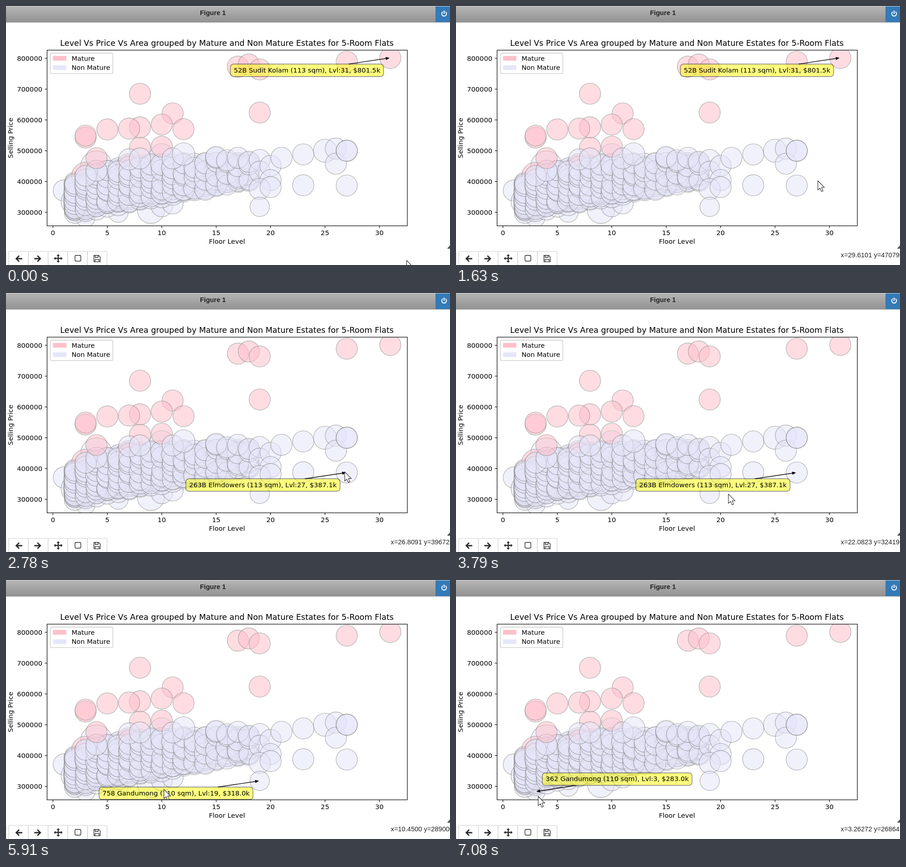
An HTML page for the animation above (8000 ms loop, 978 px wide and 572 px high).

```html
<!DOCTYPE html>
<html lang="en">
<head>
<meta charset="utf-8">
<title>Figure 1</title>
<style>
html, body { margin: 0; width: 100%; height: 100%; overflow: hidden; background: #fff; }
svg { display: block; }
text { white-space: pre; }
.plot text { font-family: "DejaVu Sans", sans-serif; font-size: 14.62px; }
.ui { font-family: "Liberation Sans", Arial, sans-serif; font-size: 14.63px; fill: #222; }
</style>
</head>
<body>
<svg id="stage" width="978" height="572" viewBox="0 0 978 572">
  <defs>
    <linearGradient id="bar" x2="0" y2="1">
      <stop offset="0" stop-color="#b6b6b6"/><stop offset="1" stop-color="#919191"/>
    </linearGradient>
    <clipPath id="area"><rect x="90.5" y="97.5" width="793.5" height="388"/></clipPath>
  </defs>
  <rect width="978" height="572" fill="#fff"/>

  <rect width="978" height="36.5" fill="url(#bar)"/>
  <rect width="978" height="1" fill="#dcdcdc"/>
  <text class="ui" x="455.6" y="20" text-anchor="middle" font-weight="bold">Figure 1</text>
  <rect x="946" y="1" width="40" height="34.5" fill="#337ab7"/>
  <path d="M961.6 13.2a5.2 5.2 0 1 0 6.8 0M965 10.8v6" fill="none" stroke="#fff" stroke-width="2" stroke-linecap="round"/>

  <g class="plot">
    <g id="bubbles" clip-path="url(#area)"></g>
    <g id="axes" stroke="#000" stroke-width="1.2" fill="none">
      <rect x="90.5" y="97.5" width="793.5" height="388"/>
    </g>
    <g id="labels" fill="#000">
      <text x="486.7" y="88" text-anchor="middle" style="font-size:17.58px">Level Vs Price Vs Area grouped by Mature and Non Mature Estates for 5-Room Flats</text>
      <text x="486.7" y="525" text-anchor="middle">Floor Level</text>
      <text transform="translate(15.3 291.5) rotate(-90)" text-anchor="middle">Selling Price</text>
    </g>
    <rect x="97.8" y="104.2" width="137.6" height="45.2" rx="3" fill="#fff" fill-opacity=".8" stroke="#ccc" stroke-width="1.4"/>
    <rect x="103.5" y="110.3" width="29.5" height="10.4" fill="#ffc0cb"/>
    <rect x="103.5" y="131" width="29.5" height="10.4" fill="#e6e6fa"/>
    <text x="144.4" y="120.8">Mature</text>
    <text x="144.4" y="141">Non Mature</text>
    <rect id="box" height="27.5" rx="6.5" fill="#ff0" stroke="#000" stroke-width="1.4" opacity=".5"/>
    <path id="arrow" stroke="#000" stroke-width="1.4"/>
    <path id="head" d="M0 0L-7 -2.9V2.9Z" stroke="#000" stroke-width=".8" stroke-linejoin="round"/>
    <text id="label"></text>
  </g>

  <path d="M978 528.5V536H971.5Z" fill="#555"/>
  <g id="buttons" fill="#fff" stroke="#ccc" stroke-width="1.1"></g>
  <g fill="#2b2b2b">
    <path id="back" d="M20.5 558l7.6-7.4 1.9 1.9-4 4H35.8v3H26l4 4-1.9 1.9Z"/>
    <use href="#back" transform="translate(98.2 0) scale(-1 1)"/>
    <path d="M115 548l3.6 3.9h-2.4v4.4h4.6v-2.4l3.9 3.6-3.9 3.6v-2.4h-4.6v4.4h2.4l-3.6 3.9-3.6-3.9h2.4v-4.4h-4.6v2.4l-3.9-3.6 3.9-3.6v2.4h4.6v-4.4h-2.4Z"/>
  </g>
  <g fill="none" stroke="#2b2b2b" stroke-width="1.4" stroke-linejoin="round">
    <rect x="152" y="550.7" width="12.8" height="12.8" rx="2.4"/>
    <path d="M193.7 550.7h10.2l3.6 3.6v10.6h-13.8ZM196.5 550.7v4.6h6.4v-4.6M196.3 564.9v-5.3h8.6v5.3"/>
  </g>

  <text id="status" class="ui" x="847.6" y="555.3"></text>
  <path id="cursor" d="M0 0V20.4L4.6 16.2 8 23.7 11.4 22.2 8.1 14.8H14.6Z" fill="#fff" stroke="#222" stroke-width="1.1" stroke-linejoin="round"/>
</svg>
<script>
(() => {
  const LOOP = 8000, STEP = 78;
  const $ = id => document.getElementById(id);
  const px = floor => 103.4 + 23.97 * floor;
  const py = price => 115.5 + (800 - price) * 0.6805;

  function set(el, attrs) {
    for (const k in attrs) el.setAttribute(k, attrs[k]);
    return el;
  }

  function add(parent, tag, attrs, text = '') {
    const el = set(document.createElementNS('http://www.w3.org/2000/svg', tag), attrs);
    el.textContent = text;
    $(parent).append(el);
  }

  function drawFrame() {
    for (let v = 0; v <= 30; v += 5) {
      add('axes', 'path', { d: `M${px(v)} 485.5v5` });
      add('labels', 'text', { x: px(v), y: 505.6, 'text-anchor': 'middle' }, v);
    }
    for (let v = 300; v <= 800; v += 100) {
      add('axes', 'path', { d: `M90.5 ${py(v)}h-5` });
      add('labels', 'text', { x: 80, y: py(v) + 5.2, 'text-anchor': 'end' }, v * 1000);
    }
    for (let i = -1; i < 5; i++)
      add('buttons', 'rect', { x: 6.1 + 43.3 * i - (i < 0 ? 6 : 0), y: 542, width: 43.3, height: 40, rx: 2 });
  }

  let seed = 11;
  const rnd = () => (seed = (seed * 16807) % 2147483647) / 2147483647;

  const bubble = (fill, floor, price, r = 23.4) => add('bubbles', 'circle', {
    cx: px(floor), cy: py(price), r, fill, stroke: '#808080', 'stroke-width': 1.4, opacity: 0.55
  });
  const mature = b => bubble('#ffc0cb', ...b);
  const young = b => bubble('#e6e6fa', ...b);

  // Dense band that rises and thins out with the floor
  function crowd(share) {
    for (let floor = 2; floor <= 18; floor++) {
      const up = floor - 2;
      const low = 298 + 6.2 * up;
      const high = 464 - 66 * Math.exp(-up / 3);
      const n = Math.round((30 - 1.35 * up) * share);
      for (let k = 0; k < n; k++)
        young([floor, low + (high - low) * (k + rnd()) / n, 21.5 + 3 * rnd()]);
    }
  }

  // Bubbles: floor, price in thousands, radius
  function drawBubbles() {
    [[1, 371], [2, 335, 30], [3, 283, 21], [6, 300, 22], [9, 308, 30], [10, 320], [11, 329],
     [4, 448, 35], [10, 485, 26]].forEach(young);
    crowd(0.72);
    [[3, 417, 31], [3, 360, 29], [3, 382, 26], [4, 364], [6, 379], [7, 386, 28], [7, 448, 29], [7, 449]].forEach(mature);
    crowd(0.28);
    [[8, 510], [10, 513], [8, 685], [11, 621], [10, 585], [12, 570], [8, 576], [7, 572], [5, 569], [3, 543],
     [3, 549], [17, 773], [18, 780], [19, 764], [19, 624], [27, 789], [31, 801]].forEach(mature);
    [[3, 419], [4, 435], [7, 472], [8, 475], [11, 475], [12, 489, 25], [15, 477], [15, 480], [16, 469],
     [17, 477], [18, 464], [19, 470], [19, 432], [20, 451], [20, 405], [19, 376], [20, 382], [21, 477],
     [23, 488], [25, 500, 25.5], [26, 507], [26, 458], [27, 500], [27, 500], [23, 388], [27, 387],
     [19, 318, 21.5]].forEach(young);
    mature([4, 476]);
  }

  // Spans in which the picture refreshes; it rests in between
  const spans = [[70, 600], [840, 840], [1300, 2090], [2170, 2940], [3320, 4110],
    [4190, 4250], [4420, 4500], [5030, 5820], [5910, 6690], [6780, 7080]];

  // Pointer path: time, floor, price in thousands
  const path = [[0, 32.5, 144], [225, 32.2, 360], [450, 31.7, 690], [600, 31.4812, 783.85], [1221, 31.4812, 783.85],
    [1458, 30.4, 584], [1537, 29.6101, 470.795], [1616, 28.94, 402.5], [1774, 27.9, 387], [2090, 27.1, 385],
    [2709, 26.8091, 396.725], [2786, 26.8091, 389.5], [3240, 26.8091, 389.5], [3557, 24.6, 353],
    [3715, 22.0823, 324.195], [3794, 20.72, 317], [4110, 19.2, 321], [4250, 18.42, 331],
    [4500, 18.7998, 308.765], [5030, 18.59, 304], [5430, 13.4, 285], [5820, 10.45, 289], [6300, 9.1, 296],
    [6456, 5.66987, 270.185], [6534, 3.95, 266], [7005, 3.26272, 268.645], [7080, 3.24, 267.3]];

  // Notes: time, floor, price, side, label
  const notes = [
    [0, 31, 801.5, -1, '52B Sudit Kolam (113 sqm), Lvl:31, $801.5k'],
    [2400, 27, 387.1, -1, '263B Elmdowers (113 sqm), Lvl:27, $387.1k'],
    [4420, 19, 318, -1, '758 Gandumong (110 sqm), Lvl:19, $318.0k'],
    [6140, 9, 308, 1, '64 Elmdowers (121 sqm), Lvl:9, $308.0k'],
    [6690, 3, 283, 1, '362 Gandumong (110 sqm), Lvl:3, $283.0k']
  ];

  // Time of the latest refresh
  function hold(t) {
    const span = spans.filter(s => s[0] <= t).pop();
    if (!span) return 0;
    const [a, b] = span;
    const step = (b - a) / Math.max(1, Math.round((b - a) / STEP)) || 1;
    return Math.min(b, a + Math.floor((t - a) / step + 0.2) * step);
  }

  function pointer(t) {
    const i = path.findIndex(k => k[0] > t);
    if (i < 0) return path[path.length - 1].slice(1);
    const [t0, x0, y0] = path[i - 1], [t1, x1, y1] = path[i];
    const f = (t - t0) / (t1 - t0);
    return [x0 + (x1 - x0) * f, y0 + (y1 - y0) * f];
  }

  let shown;
  function showNote(note) {
    if (note === shown) return;
    shown = note;
    const [, floor, price, side, words] = note;
    $('label').textContent = words;
    const w = $('label').getComputedTextLength() + 14.6, h = 27.5;
    const x = px(floor), y = py(price);
    const cx = x + side * (14.8 + w / 2), cy = y - side * h;
    const dx = x - cx, dy = y - cy, len = Math.hypot(dx, dy);
    const at = gap => `${x - dx / len * gap} ${y - dy / len * gap}`;
    set($('box'), { x: cx - w / 2, y: cy - h / 2, width: w });
    set($('label'), { x: cx - w / 2 + 7.3, y: cy + 4.6 });
    set($('arrow'), { d: `M${cx + dx / 2} ${cy + dy / 2}L${at(5)}` });
    set($('head'), { transform: `translate(${at(2.6)}) rotate(${Math.atan2(dy, dx) * 180 / Math.PI})` });
  }

  function draw(t) {
    const now = hold(t);
    const [x, y] = pointer(now);
    set($('cursor'), { transform: `translate(${px(x)} ${py(y)})` });
    // The readout trails the pointer by one refresh
    const [floor, price] = pointer(hold(now - STEP / 2));
    $('status').textContent = price < 256 ? '' : `x=${floor.toPrecision(6)} y=${Math.floor(price * 1000)}`;
    showNote(notes.filter(n => n[0] <= now + 0.01).pop());
  }

  function tick(ms) {
    draw(ms % LOOP);
    requestAnimationFrame(tick);
  }

  drawFrame();
  drawBubbles();
  draw(0);
  requestAnimationFrame(tick);
})();
</script>
</body>
</html>
```
